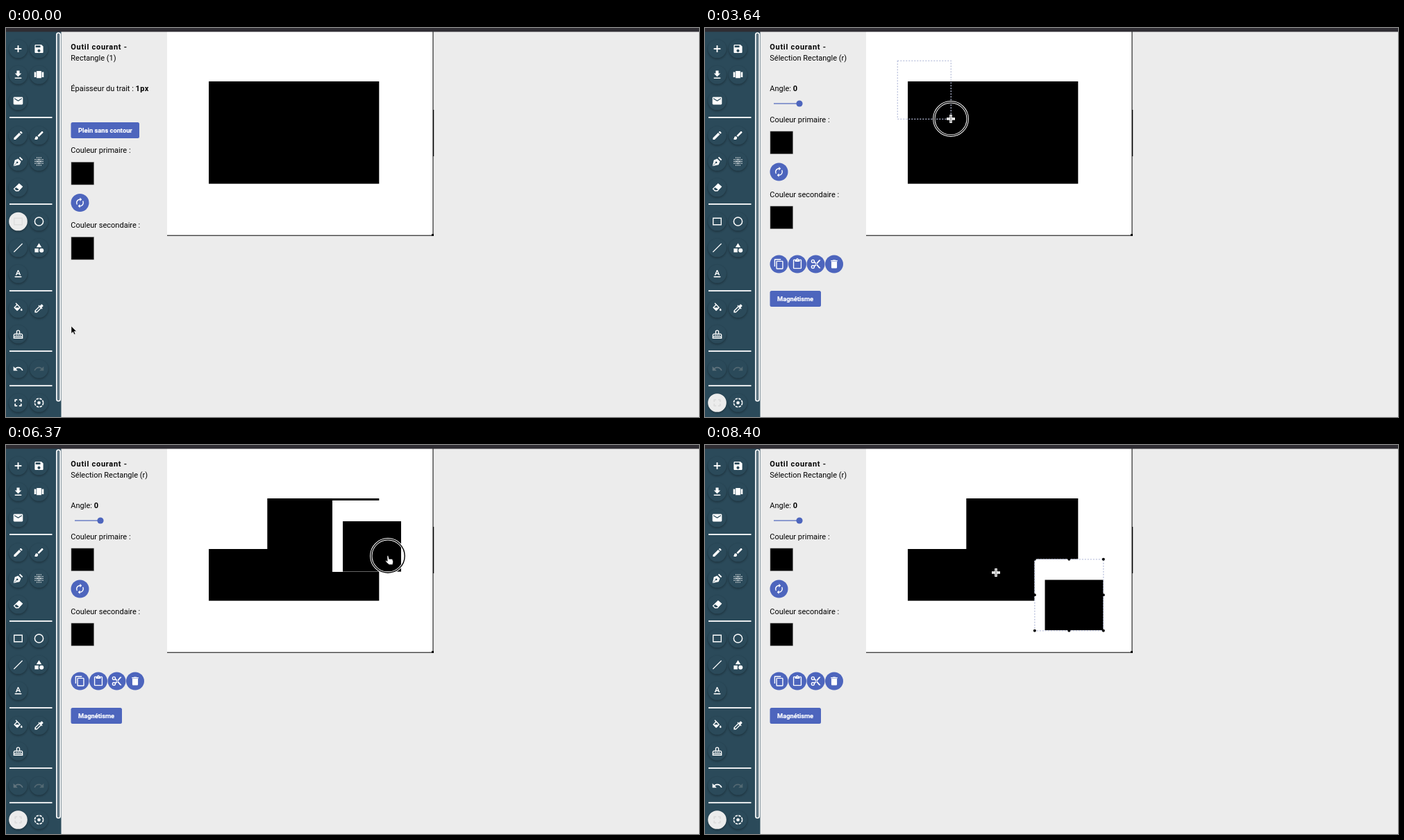
Animation of 998x561 px, one loop 8.47 s. Source, as an HTML page:

```html
<!DOCTYPE html>
<html lang="fr">
<head>
<meta charset="utf-8">
<title>Outil de sélection</title>
<style>
  html, body { margin: 0; width: 100%; height: 100%; overflow: hidden; background: #ececec; }
  svg { display: block; }
  text { font: 11px Roboto, sans-serif; fill: #000; white-space: pre; }
  .bold { font-weight: 700; letter-spacing: .7px; }
  .value { font-weight: 700; letter-spacing: .4px; }
  .label { font-size: 9.3px; font-weight: 700; fill: #fff; stroke: #fff; stroke-width: .2px; }
</style>
</head>
<body>
<svg id="stage" width="998" height="561" viewBox="0 0 998 561"></svg>
<script>
const LOOP = 8470, STEP = 70;
const TEAL = '#2b4a5a', BLUE = '#4d65bd', PALE = '#ececec';

const stroked = (d, width = 2) =>
  `<path d="${d}" fill="none" stroke="currentColor" stroke-width="${width}"/>`;
const filled = d => `<path d="${d}" fill="currentColor" fill-rule="evenodd"/>`;
const dots = () => {
  let out = '';
  for (let i = 0; i < 5; i++) for (let j = 0; j < 5; j++) {
    const far = Math.abs(i - 2) + Math.abs(j - 2);
    if (far < 4) out += `<circle cx="${4 + i * 4}" cy="${4 + j * 4}" r="${far < 2 ? 1.6 : 1.1}" fill="currentColor"/>`;
  }
  return out;
};
const undoPath = 'M12.5 8c-2.65 0-5.05.99-6.9 2.6L2 7v9h9l-3.62-3.62c1.39-1.16 3.16-1.88 5.12-1.88 3.54 0 6.55 2.31 7.6 5.5l2.37-.78C21.08 11.03 17.15 8 12.5 8z';

const icons = {
  add: filled('M19 13h-6v6h-2v-6H5v-2h6V5h2v6h6v2z') + stroked('M12 5v14M5 12h14', 2.4),
  save: filled('M17 3H5c-1.11 0-2 .9-2 2v14c0 1.1.89 2 2 2h14c1.1 0 2-.9 2-2V7l-4-4zm-5 16c-1.66 0-3-1.34-3-3s1.34-3 3-3 3 1.34 3 3-1.34 3-3 3zm3-10H5V5h10v4z'),
  download: filled('M19 9h-4V3H9v6H5l7 7 7-7zM5 18v2h14v-2H5z'),
  carousel: filled('M7 19h10V4H7v15zm-5-2h4V6H2v11zM18 6v11h4V6h-4z'),
  mail: filled('M20 4H4c-1.1 0-2 .9-2 2v12c0 1.1.9 2 2 2h16c1.1 0 2-.9 2-2V6c0-1.1-.9-2-2-2zm0 4l-8 5-8-5V6l8 5 8-5v2z'),
  pencil: filled('M3 17.25V21h3.75L17.81 9.94l-3.75-3.75L3 17.25zM20.71 7.04c.39-.39.39-1.02 0-1.41l-2.34-2.34c-.39-.39-1.02-.39-1.41 0l-1.83 1.83 3.75 3.75 1.83-1.83z'),
  brush: filled('M7 14c-1.66 0-3 1.34-3 3 0 1.31-1.16 2-2 2 .92 1.22 2.49 2 4 2 2.21 0 4-1.79 4-4 0-1.66-1.34-3-3-3zm13.71-9.37l-1.34-1.34c-.39-.39-1.02-.39-1.41 0L9 12.25 11.75 15l8.96-8.96c.39-.39.39-1.02 0-1.41z'),
  nib: filled('M2 22L5 9l7-3 6 6-3 7zM14 4l2-2 6 6-2 2zM10 12a2 2 0 1 0 .1 0z') + `<path d="M3 21l7-7" stroke="${TEAL}"/>`,
  spray: dots(),
  eraser: filled('M14 3l8 7-9 10H7l-5-5zM7.500 12l-3 3 3.500 3h4l1.500-2z'),
  rect: stroked('M3.500 5h17v14h-17z'),
  circle: stroked('M3 12a9 9 0 1 0 18 0a9 9 0 1 0-18 0z', 2.2),
  line: stroked('M3 21L21 3', 2),
  shapes: filled('M12 2l-5.500 9h11zM13 17.500a4.500 4.500 0 1 0 9 0a4.500 4.500 0 1 0-9 0zM3 13.500h8v8H3z'),
  text: filled('M5 17v2h14v-2H5zm4.5-4.2h5l.9 2.2h2.1L12.75 4h-1.5L6.5 15h2.1l.9-2.2zM12 5.98L13.87 11h-3.74L12 5.98z') + stroked('M5 18.500h14M8 14.500L12 5l4 9.500', 1.4),
  fill: filled('M16.56 8.94L7.62 0 6.21 1.41l2.38 2.38-5.15 5.15c-.59.59-.59 1.54 0 2.12l5.5 5.5c.29.29.68.44 1.06.44s.77-.15 1.06-.44l5.5-5.5c.59-.58.59-1.53 0-2.12zM5.21 10L10 5.21 14.79 10H5.21zM19 11.5s-2 2.17-2 3.5c0 1.1.9 2 2 2s2-.9 2-2c0-1.33-2-3.5-2-3.5z'),
  pipette: filled('M20.71 5.63l-2.34-2.34c-.39-.39-1.02-.39-1.41 0l-3.12 3.12-1.93-1.91-1.41 1.41 1.42 1.42L3 16.25V21h4.75l8.92-8.92 1.42 1.42 1.41-1.41-1.92-1.92 3.12-3.12c.4-.4.4-1.03.01-1.42zM6.92 19L5 17.08l8.06-8.06 1.92 1.92L6.92 19z'),
  stamp: stroked('M3 20.500h18v-6q0-3-3-3H6q-3 0-3 3zM9 11V7a3 3 0 0 1 6 0v4M3 17h18') + stroked('M7 14.200h2m2 0h2m2 0h2', 2),
  undo: filled(undoPath),
  redo: `<g transform="matrix(-1 0 0 1 24 0)">${filled(undoPath)}</g>`,
  frame: filled('M7 14H5v5h5v-2H7v-3zm-2-4h2V7h3V5H5v5zm12 7h-3v2h5v-5h-2v3zM14 5v2h3v3h2V5h-5z') + stroked('M5 10V5h5m4 0h5v5m0 4v5h-5m-4 0H5v-5', 1.2),
  lasso: `<circle cx="12" cy="12" r="9" fill="none" stroke="currentColor" stroke-width="2.4" stroke-dasharray="5.200 1.870"/><circle cx="12" cy="12" r="3.4" fill="currentColor"/>`,
  swap: filled('M12 6v3l4-4-4-4v3c-4.42 0-8 3.58-8 8 0 1.57.46 3.03 1.24 4.26L6.7 14.8c-.45-.83-.7-1.79-.7-2.8 0-3.31 2.69-6 6-6zm6.76 1.74L17.3 9.2c.44.84.7 1.79.7 2.8 0 3.31-2.69 6-6 6v-3l-4 4 4 4v-3c4.42 0 8-3.58 8-8 0-1.57-.46-3.03-1.24-4.26z'),
  copy: filled('M16 1H4c-1.1 0-2 .9-2 2v14h2V3h12V1zm3 4H8c-1.1 0-2 .9-2 2v14c0 1.1.9 2 2 2h11c1.1 0 2-.9 2-2V7c0-1.1-.9-2-2-2zm0 16H8V7h11v14z'),
  paste: filled('M19 2h-4.18C14.4.84 13.3 0 12 0c-1.3 0-2.4.84-2.82 2H5c-1.1 0-2 .9-2 2v16c0 1.1.9 2 2 2h14c1.1 0 2-.9 2-2V4c0-1.1-.9-2-2-2zm-7 0c.55 0 1 .45 1 1s-.45 1-1 1-1-.45-1-1 .45-1 1-1zm7 18H5V4h2v3h10V4h2v16z'),
  cut: stroked('M3 6a3 3 0 1 0 6 0a3 3 0 1 0-6 0M3 18a3 3 0 1 0 6 0a3 3 0 1 0-6 0') + filled('M8 8l2-1.500L22 20v1h-3zM8 16l2 1.500 12-13.500V3h-3z'),
  trash: filled('M6 19c0 1.1.9 2 2 2h8c1.1 0 2-.9 2-2V7H6v12zM19 4h-3.5l-1-1h-5l-1 1H5v2h14V4z'),
};

const icon = (name, x, y, scale = .68) =>
  `<g transform="translate(${x} ${y}) scale(${scale}) translate(-12 -12)">${icons[name]}</g>`;
const tool = (name, x, y) => `<g id="${name}" color="#fff">
  <circle cx="${x}" cy="${y + 1.5}" r="13.5" fill="#000" opacity=".3" filter="url(#soft)"/>
  <circle class="face" cx="${x}" cy="${y}" r="13.3" fill="${TEAL}"/>${icon(name, x, y)}</g>`;
const action = (name, x, y) =>
  `<g color="#fff"><circle cx="${x}" cy="${y}" r="13" fill="${BLUE}"/>${icon(name, x, y)}</g>`;
const text = (x, y, content, cls = '') => `<text x="${x}" y="${y}" class="${cls}">${content}</text>`;
const box = (x, y, w, h, fill, extra = '') =>
  `<rect x="${x}" y="${y}" width="${w}" height="${h}" fill="${fill}" ${extra}/>`;
const button = (y, w, label) =>
  box(93.5, y, w, 23, BLUE, 'rx="2.5"') + text(104, y + 14.7, label, 'label');
const swatch = y => box(94, y, 32.5, 32.5, '#000', 'stroke="#777" stroke-width=".6"');

const rows = [
  [30, 'add', 'save'], [67.5, 'download', 'carousel'], [105, 'mail'],
  [155, 'pencil', 'brush'], [192.5, 'nib', 'spray'], [230, 'eraser'],
  [279, 'rect', 'circle'], [317, 'line', 'shapes'], [354.5, 'text'],
  [404.5, 'fill', 'pipette'], [441.5, 'stamp'], [491.5, 'undo', 'redo'], [540.5, 'frame', 'lasso'],
];

document.getElementById('stage').innerHTML = `
  <defs><filter id="soft" x="-30%" y="-30%" width="160%" height="160%"><feGaussianBlur stdDeviation="1.6"/></filter></defs>
  ${box(0, 0, 998, 561, PALE)}
  ${box(0, 5, 79.5, 556, TEAL)}
  ${rows.map(([y, ...names]) => names.map((n, i) => tool(n, 17.5 + 30 * i, y)).join('')).join('')}
  ${[129, 254, 379, 466, 515.8].map(y => box(5, y - .9, 61.5, 1.8, '#fff')).join('')}
  <rect id="thumb" x="72.800" y="7" width="5.400" height="531" rx="2.700" fill="#5f7683" stroke="#fff" stroke-width="1.600"/>

  ${text(93.3, 31, 'Outil courant -', 'bold')}
  <g id="rectPanel">
    ${text(93.3, 47.3, 'Rectangle (1)')}
    ${text(93.3, 91, 'Épaisseur du trait : <tspan class="value">1px</tspan>')}
    ${button(136, 98.5, 'Plein sans contour')}
  </g>
  <g id="selectPanel">
    ${text(93.3, 47.3, 'Sélection Rectangle (r)')}
    ${text(93.3, 91, 'Angle: <tspan class="value">0</tspan>')}
    ${box(99, 108.4, 37, 1.2, BLUE)}<circle cx="136" cy="109" r="4.600" fill="${BLUE}"/>
    ${['copy', 'paste', 'cut', 'trash'].map((n, i) => action(n, 106.5 + 26.5 * i, 340.5)).join('')}
    ${button(379, 73.5, 'Magnétisme')}
  </g>
  <g id="colours">
    ${text(93.3, 180, 'Couleur primaire :')}${swatch(193.5)}
    ${action('swap', 106.5, 252)}
    ${text(93.3, 288, 'Couleur secondaire :')}${swatch(301.5)}
  </g>

  ${box(232, 5, 383, 294, '#fff')}
  ${box(614.5, 5, 1, 294.5, '#000')}${box(232, 298.700, 383.500, 1, '#000')}
  ${box(615, 118, 1.2, 67, '#000')}${box(613, 297, 3, 3, '#000')}
  ${box(292, 77, 245.3, 147.6, '#000')}
  <g id="moved">${box(292, 77, 84.3, 73, '#fff')}
    <g id="piece">${box(277, 47, 99.3, 103, '#fff')}${box(292, 77, 84, 72.600, '#000')}</g>
  </g>
  <g id="selection">
    <rect id="outline" fill="none" stroke="#b9c0dc" stroke-width="1.300" stroke-dasharray="2 2"/>
    <g id="handles"></g>
  </g>
  ${box(0, 0, 998, 5.5, '#2f2d33')}

  <g id="cursor">
    <g id="ring" fill="none"><circle r="24" stroke="#fff" stroke-width="3.400"/><circle r="24" stroke="#000" stroke-width="1.400"/></g>
    <path id="arrow" d="M0 0v10.500l2.500-2.300 1.700 3.800 1.700-.8-1.700-3.600h3.300z" fill="#000" stroke="#fff" stroke-width=".5"/>
    <path id="hand" d="M-1.200 0q1.300-1.200 2 .6l1 4 1.200-.6 1.300.6 1.300-.3 1.200 1 .8 3.200-.8 4.200h-5L-2 9.500-3.600 7q.8-1.200 2.800.4z" fill="#fff" stroke="#000" stroke-width=".7"/>
    <g id="cross"><path d="M0-6V6M-6 0H6" stroke="#fff" stroke-width="3.600"/><path d="M0-5V5" stroke="#555"/><path d="M-4 0H4" stroke="#bbb" stroke-width=".7"/></g>
  </g>`;

const el = id => document.getElementById(id);
const show = (id, on) => el(id).setAttribute('visibility', on ? 'visible' : 'hidden');
const put = (id, attrs) => { for (const k in attrs) el(id).setAttribute(k, attrs[k]); };
const clamp = v => Math.max(0, Math.min(1, v));

// Smooth curve through [time, x, y] keys, without overshoot.
function along(keys, t) {
  const last = keys.length - 1;
  if (t <= keys[0][0]) return keys[0].slice(1);
  if (t >= keys[last][0]) return keys[last].slice(1);
  const i = keys.findIndex(k => k[0] > t) - 1;
  const span = keys[i + 1][0] - keys[i][0], u = (t - keys[i][0]) / span;
  return [1, 2].map(c => {
    const slope = j => (keys[j + 1][c] - keys[j][c]) / (keys[j + 1][0] - keys[j][0]);
    const tangent = j => {
      if (j === 0 || j === last) return 0;
      const a = slope(j - 1), b = slope(j);
      return a * b <= 0 ? 0 : 2 * a * b / (a + b);
    };
    const p = keys[i][c], q = keys[i + 1][c], v = 1 - u;
    return p * v * v * (1 + 2 * u) + q * u * u * (3 - 2 * u)
      + span * u * v * (tangent(i) * v - tangent(i + 1) * u);
  });
}

const pointerPath = [
  [0, 94, 430], [700, 94, 430], [1400, 27, 532], [1680, 27, 532], [2450, 277, 47], [2870, 277, 47],
  [3640, 354, 131], [3850, 376, 149], [4620, 376, 149], [5180, 344, 110], [5390, 344, 110],
  [5880, 411, 91], [6370, 550, 160], [6650, 570, 204], [6930, 541, 218], [7210, 541, 227],
  [8050, 541, 227], [8330, 456, 185], [8400, 419, 184],
];
const piecePath = [
  [5460, 0, 0], [5880, 48, -15], [6370, 193, 33], [6650, 217, 80], [6930, 219, 102], [7280, 197.500, 117.500],
];
const SWITCH = 1610, PRESSES = [[2700, 3850], [5310, 7420]];

function setTool(id, face, colour) {
  el(id).setAttribute('color', colour);
  el(id).querySelector('.face').setAttribute('fill', face);
}

function draw(time) {
  const t = Math.floor(time / STEP) * STEP;
  const selecting = t >= SWITCH;
  const [x, y] = along(pointerPath, t);
  const pressed = PRESSES.some(([a, b]) => t > a && t < b);
  const hover = !selecting && Math.hypot(x - 17.5, y - 540.5) < 14;

  show('rectPanel', !selecting);
  show('selectPanel', selecting);
  put('colours', { transform: `translate(0 ${selecting ? -44.5 : 0})` });
  setTool('rect', selecting ? TEAL : PALE, selecting ? '#fff' : '#ddd');
  setTool('frame', selecting ? PALE : hover ? '#586f7b' : TEAL, selecting ? '#ddd' : '#fff');
  setTool('undo', TEAL, pressed ? '#60737d' : '#fff');
  setTool('redo', TEAL, '#526872');
  put('thumb', { height: hover ? 527 : 531 });

  const [dx, dy] = along(piecePath, t);
  show('moved', t >= PRESSES[1][0]);
  put('piece', { transform: `translate(${dx} ${dy})` });

  const drawn = t >= PRESSES[0][1];
  const w = drawn ? 99 : Math.max(0, x - 277), h = drawn ? 103 : Math.max(0, y - 47);
  const left = 277.3 + dx, top = 47.3 + dy;
  show('selection', t > 2870 && !(pressed && drawn));
  put('outline', { x: left, y: top, width: w, height: h });
  el('handles').innerHTML = !drawn ? '' : [0, 1, 2, 3, 5, 6, 7, 8].map(i =>
    `<circle cx="${left + w * (i % 3) / 2}" cy="${top + h * Math.floor(i / 3) / 2}" r="2"/>`).join('');

  const inside = drawn && x > left && x < left + 96 && y > top && y < top + h;
  const hand = hover || (selecting && x < 32 && y > 526) || inside || (pressed && drawn);
  const cross = !hand && selecting && x > 232;
  put('cursor', { transform: `translate(${x} ${y})` });
  show('hand', hand);
  show('cross', cross);
  show('arrow', !hand && !cross);

  const grow = Math.max(...PRESSES.map(([a, b]) => Math.min(clamp((t - a) / 140), clamp((b + 140 - t) / 140))));
  show('ring', grow > 0);
  el('ring').querySelectorAll('circle').forEach(c => c.setAttribute('r', 24.2 * grow));
}

const start = performance.now();
function tick() {
  draw((performance.now() - start) % LOOP);
  requestAnimationFrame(tick);
}
tick();
</script>
</body>
</html>
```
